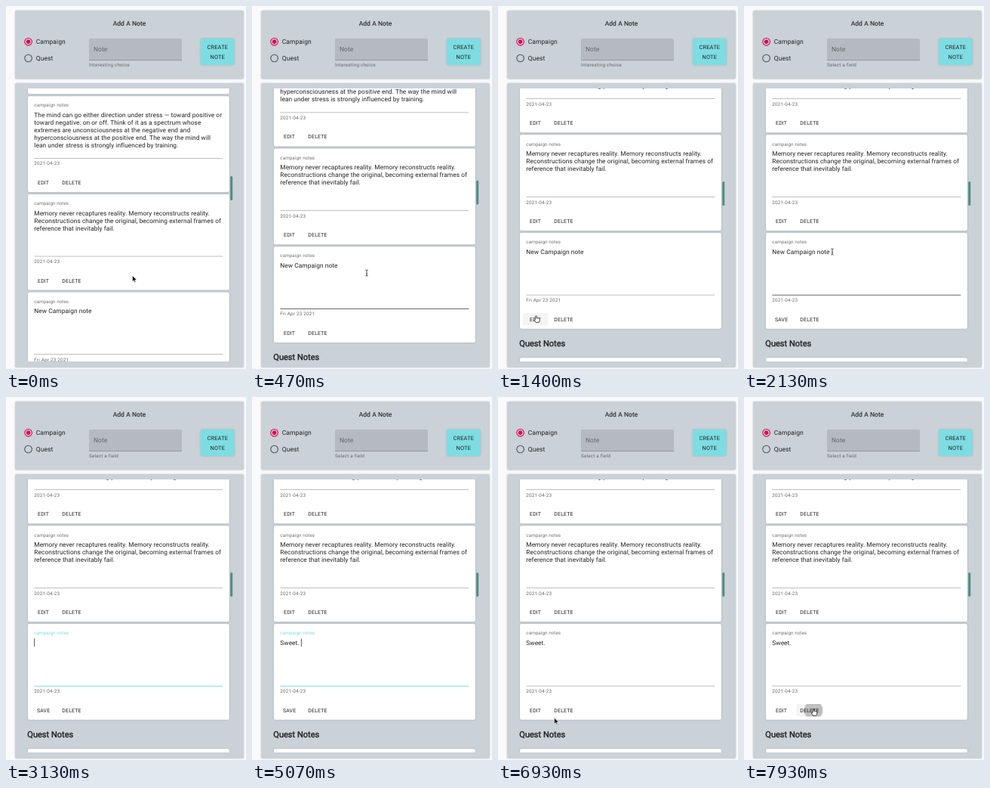
Recreate the animation shown at these times as an HTML page. Size 318 px wide and 480 px high, loop 8000 ms.

```html
<!DOCTYPE html>
<html lang="en">
<head>
<meta charset="utf-8">
<title>Notes</title>
<style>
  html, body { margin: 0; width: 100%; height: 100%; overflow: hidden; background: #fafafa; }
  svg { display: block; width: 318px; height: 480px; }
  text { font-family: Roboto, sans-serif; fill: #222; white-space: pre; text-rendering: geometricPrecision; }
  .body { font-size: 8.32px; letter-spacing: .00938em; }
  .field { font-size: 8.45px; letter-spacing: .00938em; }
  .label { font-size: 6.3px; letter-spacing: .00938em; fill: #747474; }
  .small { font-size: 6.3px; letter-spacing: .0333em; fill: #666; }
  .btn { font-size: 6.9px; letter-spacing: .02857em; text-anchor: middle; }
  .big { font-size: 7.4px; letter-spacing: .02857em; text-anchor: middle; }
  .title { font-size: 8.45px; letter-spacing: .00938em; text-anchor: middle; stroke: #222; stroke-width: .12; }
  .head { font-size: 11.05px; stroke: #222; stroke-width: .4; }
  .card { filter: drop-shadow(0 .6px .8px rgba(0, 0, 0, .18)); }
</style>
</head>
<body>
<svg id="stage" viewBox="0 0 318 480">
  <defs>
    <clipPath id="view"><rect x="26" y="109" width="273" height="361"/></clipPath>
    <clipPath id="press"><rect id="pressBox" y="406" height="16.4" rx="2"/></clipPath>
  </defs>
</svg>
<script>
const LOOP = 8000, STEP = 1000 / 15, SCROLL = 78.6;
const TEAL = '#7ddde2', PANEL = '#cad1d7';
const stage = document.getElementById('stage');

function add(parent, tag, attrs, content) {
  const el = document.createElementNS('http://www.w3.org/2000/svg', tag);
  for (const key in attrs) el.setAttribute(key, attrs[key]);
  if (content) el.textContent = content;
  parent.append(el);
  return el;
}
function set(el, attrs) {
  for (const key in attrs) el.setAttribute(key, attrs[key]);
}
const box = (p, x, y, width, height, fill, rx = 0, cls = '') =>
  add(p, 'rect', { x, y, width, height, fill, rx, class: cls });
// y is the middle of the capitals
const SIZE = { body: 8.32, field: 8.45, label: 6.3, small: 6.3, btn: 6.9, big: 7.4, title: 8.45, head: 11.05 };
const write = (p, cls, x, y, content) =>
  add(p, 'text', { class: cls, x, y: y + SIZE[cls] * .355 }, content);
const show = (el, on) => { el.style.display = on ? '' : 'none'; };

// Form panel
box(stage, 12, 6, 303, 90.5, PANEL, 2, 'card');
write(stage, 'title', 163.5, 23.5, 'Add A Note');
function radio(y, name, color, on) {
  add(stage, 'circle', { cx: 29.6, cy: y, r: 4.8, fill: 'none', stroke: color, 'stroke-width': 1.1 });
  if (on) add(stage, 'circle', { cx: 29.6, cy: y, r: 2.7, fill: color });
  write(stage, 'field', 39.8, y, name);
}
radio(47.3, 'Campaign', '#dc004e', true);
radio(69, 'Quest', '#505356', false);
add(stage, 'path', { d: 'M110 72V45a2 2 0 0 1 2-2H231a2 2 0 0 1 2 2V72Z', fill: '#b4babf' });
box(stage, 110, 71.5, 123, .6, '#7d8184');
write(stage, 'field', 116, 57.2, 'Note').style.fill = '#62676b';
const helper = write(stage, 'small', 110, 78, '');
box(stage, 258, 43, 44.5, 35, TEAL, 2, 'card');
write(stage, 'big', 280.3, 54.5, 'CREATE');
write(stage, 'big', 280.3, 67, 'NOTE');

// List panel
box(stage, 12, 102, 303, 376, PANEL, 2, 'card');
const list = add(add(stage, 'g', { 'clip-path': 'url(#view)' }), 'g', {});

function card(top, lines, date) {
  const g = add(list, 'g', {});
  box(g, 29, top, 266.8, 126.7, '#fff', 2, 'card');
  const hover = box(g, 0, top + 106, 0, 16.4, 'rgba(0,0,0,.045)', 2);
  const select = box(g, 0, top + 19, 0, 11, '#b3d7fd');
  return {
    hover, select,
    label: write(g, 'label', 37.3, top + 12, 'campaign notes'),
    text: lines.map((line, i) => write(g, 'body', 37.3, top + 24.7 + i * 10, line))[0],
    line: box(g, 37.3, top + 81.8, 250, .6, '#949494'),
    date: write(g, 'small', 37.3, top + 89, date),
    edit: write(g, 'btn', 49.6, top + 114.2, 'EDIT'),
    erase: write(g, 'btn', 87, top + 114.2, 'DELETE'),
    caret: box(g, 37.4, top + 19.3, .7, 10.6, '#111')
  };
}
const notes = [
  card(-89.1, [''], '2021-04-23'),
  card(40.6, [
    'The mind can go either direction under stress — toward positive or',
    'toward negative: on or off. Think of it as a spectrum whose',
    'extremes are unconsciousness at the negative end and',
    'hyperconsciousness at the positive end. The way the mind will',
    'lean under stress is strongly influenced by training.'
  ], '2021-04-23'),
  card(170.3, [
    'Memory never recaptures reality. Memory reconstructs reality.',
    'Reconstructions change the original, becoming external frames of',
    'reference that inevitably fail.'
  ], '2021-04-23'),
  card(300, ['New Campaign note'], '')
];
notes.slice(0, 3).forEach(n => show(n.caret, false));
const note = notes[3];
write(list, 'head', 28.3, 446.3, 'Quest Notes');
box(list, 29, 465.3, 266.8, 60, '#fff', 2, 'card');

const ripple = add(add(stage, 'g', { 'clip-path': 'url(#press)' }), 'circle', { fill: '#000' });
const pressBox = document.getElementById('pressBox');
const thumb = box(stage, 297.2, 225, 3, 32, '#4f8c82', 1.5);

// Pointers, each drawn around its hot spot
const pointers = {
  arrow: ['M0 0V8L1.9 6.3 3.1 9.1 4.4 8.5 3.2 5.8H5.7Z', '#000', '#fff', .6],
  beam: ['M-1.7-4Q0-4 0-3Q0-4 1.7-4M0-3V3M-1.7 4Q0 4 0 3Q0 4 1.7 4M-.8 1H.8', 'none', '#222', .8],
  hand: ['M-.8 4.6V.4Q0-.7.8.4V3Q1.7 2.3 2.3 3.2Q3.2 2.7 3.7 3.6Q4.8 3.4 4.8 4.6Q4.9 6.8 3.8 8.8H-.4' +
         'Q-1.4 6.9-2.8 5.6Q-2.6 4.4-.8 5.6', '#fff', '#111', .75]
};
for (const name in pointers) {
  const [d, fill, stroke, width] = pointers[name];
  pointers[name] = add(stage, 'path', { d, fill, stroke, 'stroke-width': width, 'stroke-linejoin': 'round' });
}

// Piecewise eased value: rows are [time, ...values]
function track(rows, t) {
  let i = 0;
  while (i < rows.length - 1 && rows[i + 1][0] <= t) i++;
  const a = rows[i], b = rows[i + 1] || a;
  const p = b === a ? 0 : Math.max(0, (t - a[0]) / (b[0] - a[0]));
  const e = p * p * (3 - 2 * p);
  return a.slice(1).map((v, k) => v + (b[k + 1] - v) * e);
}
const latest = (rows, t) => rows.filter(r => r[0] <= t).pop();

const MOVES = [
  [0, 167.5, 356.5], [130, 167.5, 356.5], [460, 152, 353], [900, 152, 353],
  [1390, 50.5, 409.6], [1730, 50.5, 409.6], [2130, 117, 325], [2250, 117, 325],
  [2600, 15, 326], [5500, 15, 326], [5501, 62, 338], [6190, 52.5, 411.6],
  [6550, 52.5, 411.6], [7000, 76, 425], [7200, 86, 420], [7400, 92, 412.5]
];
const WHEEL = [[0, 0], [30, 0], [200, 20], [330, 42], [460, 60.3], [600, SCROLL]];
const TYPED = [
  [0, 'New Campaign note'], [3130, ''], [3530, 'S'], [3800, 'Sw'], [4070, 'Swe'],
  [4270, 'Swee'], [4465, 'Sweet'], [4930, 'Sweet.'], [5065, 'Sweet. ']
];
const BUTTONS = [[32.8, 33.6], [69.5, 35]];
const PRESSES = [[1590, 0], [6330, 0], [7800, 1]];

function draw(t) {
  const [off] = track(WHEEL, t), shift = SCROLL - off;
  const [x, y] = track(MOVES, t);
  const hidden = t >= 3130 && t < 5530;
  const dragging = t >= 2260 && t < 3130;
  const focused = t >= 2260 && t < 6330;
  const editing = t >= 1660 && t < 6530;

  list.setAttribute('transform', `translate(0 ${shift})`);
  thumb.setAttribute('y', 225 + 7 * off / SCROLL);
  helper.textContent = t < 1660 ? 'Interesting choice' : 'Select a field';

  const cy = y - shift;
  const inField = !hidden && cy > 304 && cy < 382 && x > 37 && x < 288;
  const over = hidden ? -1 : BUTTONS.findIndex(([bx, w]) => cy > 406 && cy < 422 && x > bx && x < bx + w);

  const [since, typed] = latest(TYPED, t);
  note.text.textContent = typed;
  note.date.textContent = t < 1660 ? 'Fri Apr 23 2021' : '2021-04-23';
  note.edit.textContent = editing ? 'SAVE' : 'EDIT';
  note.label.style.fill = focused ? TEAL : '';
  set(note.line, {
    fill: focused ? TEAL : inField ? '#444' : '#949494',
    height: focused ? 1 : inField ? .8 : .6
  });
  show(note.hover, over >= 0);
  if (over >= 0) set(note.hover, { x: BUTTONS[over][0], width: BUTTONS[over][1] });

  const end = 37.3 + (typed ? note.text.getComputedTextLength() : 0);
  const from = Math.min(end, Math.max(37.3, x));
  show(note.select, dragging);
  set(note.select, { x: from, width: end - from });
  show(note.caret, focused && !dragging && (t - since) % 1000 < 500);
  note.caret.setAttribute('x', end + .1);

  // Press ripple grows, then fades
  const press = latest(PRESSES, t), age = press ? t - press[0] : 1e4;
  show(ripple, age < 500);
  if (age < 500) {
    const [bx, w] = BUTTONS[press[1]];
    const [cx, top] = track(MOVES, press[0]);
    set(pressBox, { x: bx, width: w });
    set(ripple, {
      cx, cy: top + 2, r: Math.min(24, 1 + age * .085),
      opacity: .22 * Math.min(1, (500 - age) / 300)
    });
  }

  const kind = dragging || inField ? 'beam' : over >= 0 ? 'hand' : 'arrow';
  for (const name in pointers) {
    show(pointers[name], !hidden && name === kind);
    pointers[name].setAttribute('transform', `translate(${x} ${y})`);
  }
}

const start = performance.now();
function tick() {
  const t = (performance.now() - start) % LOOP;
  // Steps of 1/15 s, rounded to the nearest 10 ms
  draw(Math.floor((t + 5) / STEP) * STEP);
  requestAnimationFrame(tick);
}
tick();
</script>
</body>
</html>
```
